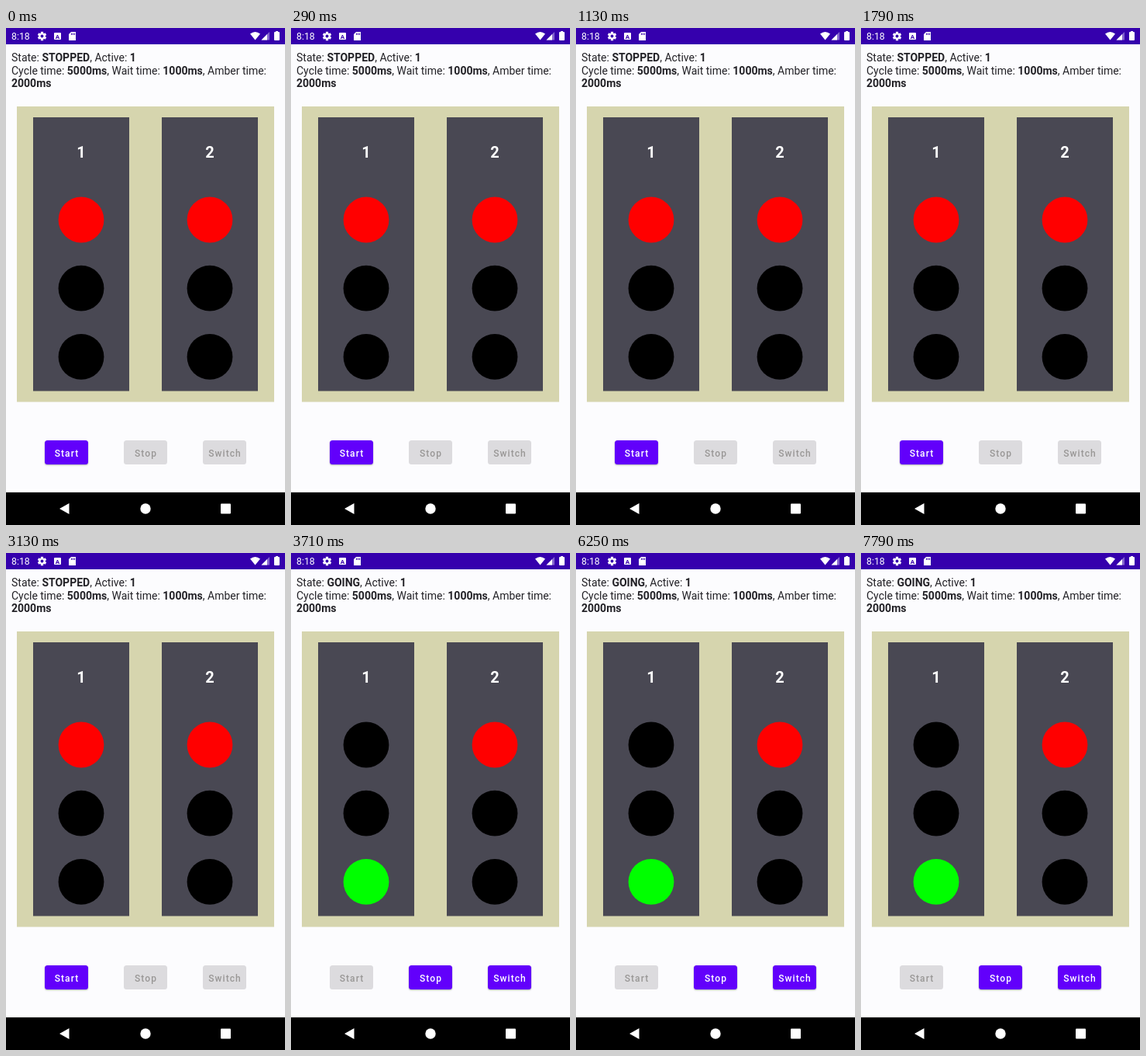
Recreate the animation shown at these times as an HTML page with a canvas. Size 360x640 px, loop 8000 ms.

```html
<!DOCTYPE html>
<html lang="en">
<head>
<meta charset="utf-8">
<title>Traffic lights</title>
<style>
  html, body { margin: 0; width: 100%; height: 100%; overflow: hidden; background: #fff; }
  canvas { display: block; }
</style>
</head>
<body>
<canvas id="stage" width="360" height="640"></canvas>
<script>
const ctx = document.getElementById('stage').getContext('2d');
const LOOP = 8000;
const START_AT = 3420;
const FONT = 'Roboto, sans-serif';
const WHITE = '#fff', BLACK = '#000', RED = '#f00', GREEN = '#0f0';
const BAR = '#3500ad';

function rect(x, y, w, h, color) {
  ctx.fillStyle = color;
  ctx.fillRect(x, y, w, h);
}

function circle(x, y, r, color) {
  ctx.fillStyle = color;
  ctx.beginPath();
  ctx.arc(x, y, r, 0, Math.PI * 2);
  ctx.fill();
}

function rounded(x, y, w, h, r, color) {
  ctx.fillStyle = color;
  ctx.beginPath();
  ctx.roundRect(x, y, w, h, r);
  ctx.fill();
}

function poly(points, color) {
  ctx.fillStyle = color;
  ctx.beginPath();
  points.forEach(([x, y]) => ctx.lineTo(x, y));
  ctx.closePath();
  ctx.fill();
}

function text(str, x, y, size, weight, color, align = 'left') {
  ctx.font = `${weight} ${size}px ${FONT}`;
  ctx.textAlign = align;
  ctx.fillStyle = color;
  ctx.fillText(str, x, y);
}

// Parts alternate between regular and bold.
function richLine(parts, y) {
  let x = 7;
  parts.forEach((part, i) => {
    text(part, x, y, 14, i % 2 ? 700 : 400, '#222126');
    x += ctx.measureText(part).width;
  });
}

function gear(x, y) {
  ctx.save();
  ctx.translate(x, y);
  for (let i = 0; i < 6; i++) {
    rect(-1.6, -5.7, 3.2, 3, WHITE);
    ctx.rotate(Math.PI / 3);
  }
  circle(0, 0, 4.2, WHITE);
  circle(0, 0, 1.9, BAR);
  ctx.restore();
}

function statusBar() {
  rect(0, 0, 360, 21, BAR);
  text('8:18', 7, 15, 12.3, 400, WHITE);
  gear(46.5, 10.5);

  rounded(62, 6, 9, 9, 1, WHITE);
  text('A', 66.5, 13.5, 8, 700, BAR, 'center');

  poly([[84, 5], [90, 5], [90, 16], [81, 16], [81, 8]], WHITE);
  [84, 86, 88].forEach(x => rect(x, 6.5, 1, 2.5, BAR));

  ctx.fillStyle = WHITE;
  ctx.beginPath();
  ctx.moveTo(321.5, 15.5);
  ctx.lineTo(315, 7.5);
  ctx.quadraticCurveTo(321.5, 2.5, 328, 7.5);
  ctx.fill();

  poly([[340, 5], [340, 15.5], [329.5, 15.5]], 'rgba(255,255,255,.4)');
  poly([[337, 8], [337, 15.5], [329.5, 15.5]], WHITE);

  rect(348, 4, 3, 2, WHITE);
  rounded(346, 5, 7, 11, 1, WHITE);
}

function navBar() {
  rect(0, 598, 360, 42, BLACK);
  poly([[69, 619], [81.5, 612], [81.5, 626]], WHITE);
  circle(180, 619, 6.7, WHITE);
  rounded(277, 612.5, 13, 13, 1, WHITE);
}

function light(x, label, lamps) {
  rect(x, 115, 124, 352.5, '#494853');
  text(label, x + 62, 167, 20, 700, WHITE, 'center');
  lamps.forEach((color, i) => circle(x + 62, 247 + i * 88.2, 29.4, color));
}

function button(x, label, enabled) {
  ctx.save();
  if (enabled) {
    ctx.shadowColor = 'rgba(0,0,0,.3)';
    ctx.shadowBlur = 2;
    ctx.shadowOffsetY = 1;
  }
  rounded(x, 531, 56, 31, 3.5, enabled ? '#6200fb' : '#dcdbde');
  ctx.restore();
  ctx.letterSpacing = '1.07px';
  text(label, x + 28.5, 551.5, 12, 500, enabled ? WHITE : '#999796', 'center');
  ctx.letterSpacing = '0px';
}

function draw(t) {
  const going = t >= START_AT;
  rect(0, 0, 360, 640, WHITE);
  rect(0, 21, 360, 573, '#fcfcfe');
  statusBar();

  richLine(['State: ', going ? 'GOING' : 'STOPPED', ', Active: ', '1'], 43);
  richLine(['Cycle time: ', '5000ms', ', Wait time: ', '1000ms', ', Amber time:'], 59.5);
  richLine(['', '2000ms'], 76);

  rect(14, 101, 332, 380.5, '#d6d5ae');
  light(35, '1', going ? [BLACK, BLACK, GREEN] : [RED, BLACK, BLACK]);
  light(201, '2', [RED, BLACK, BLACK]);

  button(50, 'Start', !going);
  button(152, 'Stop', going);
  button(254, 'Switch', going);
  navBar();
}

const begin = performance.now();
function frame() {
  draw((performance.now() - begin) % LOOP);
  requestAnimationFrame(frame);
}
frame();
</script>
</body>
</html>
```
